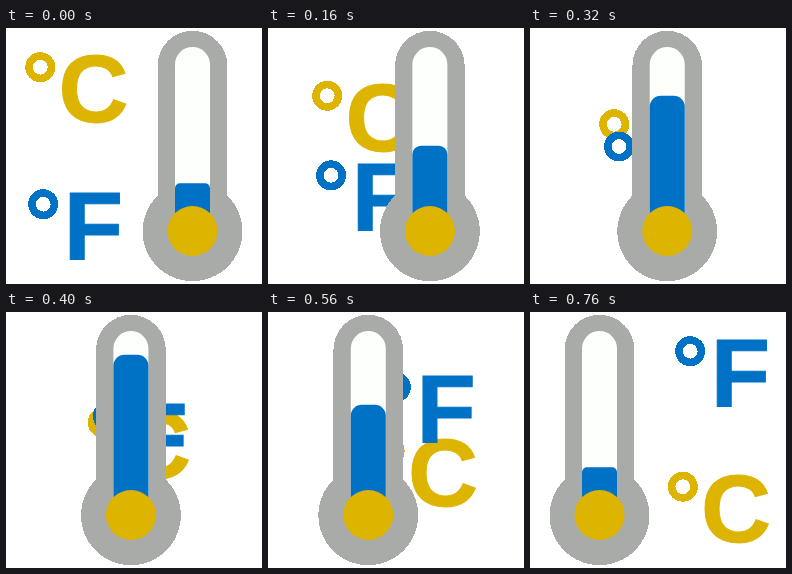
Write an HTML page that moves like this. It is 256 by 256 pixels and loops after 0.8 s.

```html
<!DOCTYPE html>
<html lang="en">
<head>
<meta charset="utf-8">
<title>Thermometer</title>
<style>
  html, body { margin: 0; width: 100%; height: 100%; overflow: hidden; background: #fff; }
  svg { display: block; width: 100vw; height: 100vh; }
  text { font: bold 97px "Liberation Sans", Arial, sans-serif; text-anchor: middle; }
  circle.ring { fill: none; stroke-width: 7.6; }
  .gold { fill: #ddb400; stroke: #ddb400; }
  .blue { fill: #0072c6; stroke: #0072c6; }
  .gray { fill: #a9aba8; }
  .gray, .ring { shape-rendering: crispEdges; }
  text, #bulb, #fluid { stroke: none; }
</style>
</head>
<body>
<svg viewBox="0 0 256 256">
  <g id="celsius">
    <circle class="ring gold" cx="34.3" cy="39.2" r="11.2"/>
    <text class="gold" x="87.6" y="94.3">C</text>
  </g>
  <g id="fahrenheit">
    <circle class="ring blue" cx="37.2" cy="176.2" r="11.2"/>
    <text class="blue" x="87.5" y="230.6">F</text>
  </g>
  <g id="thermometer">
    <rect class="gray" x="151.7" y="2.8" width="69.6" height="200" rx="34.8"/>
    <circle class="gray" cx="186.5" cy="203.3" r="49.9"/>
    <path fill="#fdfffc" d="M169 186V36.5a17.5 17.5 0 0 1 35 0V186z"/>
    <path id="fluid" class="blue"/>
    <circle id="bulb" class="gold" cx="186.5" cy="203" r="25"/>
  </g>
</svg>
<script>
  const LOOP = 800, STEP = 40, LAST = LOOP / STEP - 1;
  const byId = id => document.getElementById(id);
  const slide = (id, dx, dy, p) =>
    byId(id).setAttribute('transform', `translate(${dx * p} ${dy * p})`);

  function draw() {
    const step = Math.floor(performance.now() % LOOP / STEP);
    const p = step / LAST;
    slide('celsius', 118.5, 135.5, p);
    slide('fahrenheit', 123, -137, p);
    slide('thermometer', -117, 0, p);

    // The fluid rises to the middle of the loop, then falls at the same rate.
    const level = Math.max(0, 9 - Math.abs(step - 10));
    const top = 155.3 - 12.5 * level;
    const r = Math.min(11, 5 + 1.2 * level);
    byId('fluid').setAttribute('d',
      `M169 186V${top + r}a${r} ${r} 0 0 1 ${r} ${-r}H${204 - r}a${r} ${r} 0 0 1 ${r} ${r}V186z`);
    requestAnimationFrame(draw);
  }
  draw();
</script>
</body>
</html>
```
